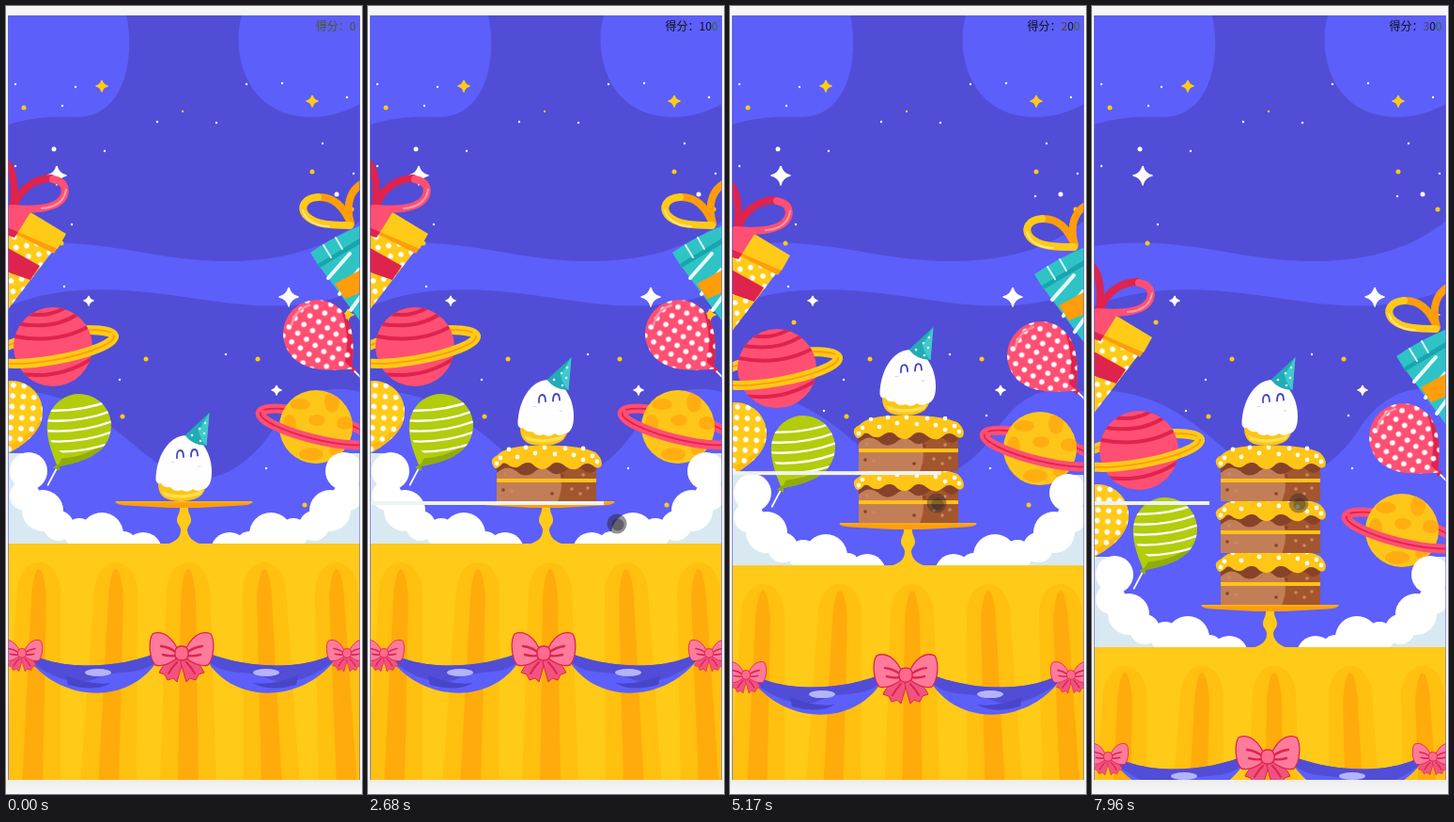
These frames come from a looping animation (379x837 px, 8 s). An HTML page:

```html
<!DOCTYPE html>
<html lang="zh">
<head>
<meta charset="utf-8">
<title>Cake stacking</title>
<style>
html, body { margin: 0; width: 100%; height: 100%; overflow: hidden; background: #f6f6f6; }
svg { display: block; width: 379px; height: 837px; }
text { font: 12px "Noto Sans CJK SC", "Noto Sans CJK", "Noto Sans", sans-serif; }
</style>
</head>
<body>
<svg id="stage" viewBox="0 0 379 837"></svg>
<script>
const DARK = '#514dd6', LIGHT = '#5c5ff9', YELLOW = '#ffca18', ORANGE = '#ff9d0a';
const PINK = '#ff4f73', RED = '#de234d', TEAL = '#2fc3c6', WHITE = '#fff', MIST = '#d9e9f1';

const path = (d, fill, extra = '') => `<path d="${d}" fill="${fill}" ${extra}/>`;
const line = (d, color, w) => path(d, 'none', `stroke="${color}" stroke-width="${w}" stroke-linecap="round"`);
const dot = (x, y, r, fill) => `<circle cx="${x}" cy="${y}" r="${r}" fill="${fill}"/>`;
const oval = (x, y, rx, ry, fill, extra = '') =>
  `<ellipse cx="${x}" cy="${y}" rx="${rx}" ry="${ry}" fill="${fill}" ${extra}/>`;
const rect = (x, y, w, h, fill) => `<rect x="${x}" y="${y}" width="${w}" height="${h}" fill="${fill}"/>`;
const group = (t, s) => `<g transform="${t}">${s}</g>`;
const clip = (id, s) => `<g clip-path="url(#${id})">${s}</g>`;
const dots = (pts, r, fill) => pts.map(([x, y]) => dot(x, y, r, fill)).join('');

function star(x, y, r, fill) {
  const k = r * 0.18;
  return path(`M${x} ${y - r}Q${x + k} ${y - k} ${x + r} ${y}Q${x + k} ${y + k} ${x} ${y + r}` +
    `Q${x - k} ${y + k} ${x - r} ${y}Q${x - k} ${y - k} ${x} ${y - r}`, fill,
    `stroke="${fill}" stroke-width="1.5" stroke-linejoin="round"`);
}

function sky() {
  return rect(2, 10, 375, 812, LIGHT) +
    path('M2 10H377V228C335 262 285 272 225 271C150 269 90 242 2 255Z', DARK) +
    path('M2 10H128C137 48 130 118 75 118C45 117 25 119 2 126Z', LIGHT) +
    path('M251 10C240 45 252 118 325 118C345 118 362 112 377 104V10Z', LIGHT) +
    path('M2 319C75 288 160 305 225 314C285 322 330 320 377 301V410C330 398 302 422 282 453C260 486 230 502 208 502C140 500 115 408 2 408Z', DARK) +
    dots([[10, 83], [74, 86], [60, 106], [105, 154], [161, 123], [224, 124], [256, 83], [294, 82],
      [363, 97], [337, 146], [370, 178], [325, 202], [10, 170], [70, 232], [62, 298], [121, 397],
      [234, 370], [277, 491], [273, 435], [100, 430]], 1.2, WHITE) +
    dots([[51, 152], [352, 200]], 2.5, WHITE) +
    dots([[19, 108], [326, 176], [368, 216], [59, 252], [68, 336], [149, 375], [268, 375],
      [124, 436], [318, 530]], 2.5, YELLOW) + dot(188, 112, 1.2, YELLOW) +
    star(102, 85, 6, YELLOW) + star(326, 101, 6, YELLOW) + star(364, 328, 6, YELLOW) +
    star(54, 180, 10, WHITE) + star(301, 309, 10, WHITE) + star(88, 313, 5, WHITE) + star(288, 408, 5, WHITE);
}

function leftGift() {
  const body = 'M0 230L53 256 0 325Z';
  return path(body, YELLOW) + path(body, 'url(#polka)') +
    path('M0 256L36 276 26 291 0 282Z', RED) +
    path('M14 236L55 257 51 263 10 242Z', ORANGE) +
    path('M0 211L26 219 13 240 0 234Z', PINK) + path('M0 234L13 240 9 246 0 243Z', RED) +
    path('M26 219L64 242 55 258 13 240Z', YELLOW) +
    line('M8 211C10 192 8 176 1 167', RED, 8) +
    line('M9 211C16 193 32 183 48 183', RED, 8) +
    line('M50 184Q66 187 62 201C56 216 30 217 6 215', PINK, 8) +
    line('M64 195C62 208 52 214 38 215', '#ff9bae', 2);
}

function rightGift() {
  return path('M334 277L378 252V336Z', TEAL) +
    [0, 1, 2].map(i => line(`M${343 + i * 12} ${289 + i * 17}L${366 + i * 10} ${263 + i * 17}`, '#e8fbfb', 4)).join('') +
    path('M350 295L378 280V304L361 311Z', ORANGE) +
    path('M324 262Q350 244 378 233V252L334 278Z', TEAL) +
    path('M332 274L378 246V252L334 278Z', '#18a5ad') +
    line('M338 254L346 267M351 246L358 258', '#d6f6f6', 2) +
    line('M367 231C361 210 367 195 380 188', ORANGE, 8) +
    line('M367 231C360 214 349 203 334 203', ORANGE, 8) +
    line('M332 203C317 204 313 214 319 222C328 233 350 233 366 233', YELLOW, 8) +
    line('M316 217C319 228 331 234 344 234', '#ffe68c', 2);
}

function ring(rx, ry, color, inner, front) {
  const d = `M${-rx} 0A${rx} ${ry} 0 0 ${front ? 0 : 1} ${rx} 0`;
  return path(d, 'none', `stroke="${color}" stroke-width="10" stroke-linecap="round"`) + line(d, inner, 1.8);
}

function planets() {
  const spot = (x, y, rx, ry) => oval(x, y, rx, ry, '#ffae12');
  const pink = group('translate(50 362) rotate(-10)', ring(66, 14, YELLOW, ORANGE, false)) +
    dot(50, 362, 42, PINK) +
    clip('pinkPlanet', line('M5 336Q50 346 78 326M5 350Q55 361 92 338M5 389Q55 400 95 372M20 326Q42 332 62 321', RED, 4)) +
    group('translate(50 362) rotate(-10)', ring(66, 14, YELLOW, ORANGE, true));
  const gold = group('translate(330 447) rotate(14)', ring(61, 13, PINK, RED, false)) +
    dot(330, 447, 39, '#ffc61a') +
    clip('goldPlanet', spot(313, 423, 11, 6) + spot(347, 421, 8, 11) + spot(331, 440, 9, 6) +
      spot(302, 444, 7, 10) + spot(361, 443, 9, 7) + spot(325, 476, 13, 7) + spot(351, 472, 7, 6)) +
    group('translate(330 447) rotate(14)', ring(61, 13, PINK, RED, true));
  return pink + gold;
}

function balloon(x, y, r, tip, turn, color, shade, deco) {
  const d = `M0 ${tip}C${-r * .35} ${tip * .8} ${-r} ${r * .65} ${-r} 0A${r} ${r} 0 0 1 ${r} 0C${r} ${r * .65} ${r * .35} ${tip * .8} 0 ${tip}Z`;
  const edge = `M0 ${tip}C${r * .35} ${tip * .8} ${r} ${r * .65} ${r} 0Q${r * .7} ${r * .7} 0 ${tip * .8}Z`;
  return group(`translate(${x} ${y}) rotate(${turn})`,
    line(`M0 ${tip}V${tip + 22}`, WHITE, 1.8) + path(d, color) + path(edge, shade) +
    path(`M-4 ${tip + 3}L0 ${tip - 4} 4 ${tip + 3}Z`, shade) + (deco || path(d, 'url(#polka)')));
}

function balloons() {
  const stripes = clip('stripes', [-20, -9, 2, 13, 24].map(y =>
    group('rotate(-33)', line(`M-36 ${y}Q0 ${y + 6} 36 ${y - 4}`, WHITE, 2.4))).join(''));
  return balloon(6, 431, 33, 50, 14, YELLOW, '#ffb90f') +
    balloon(78, 446, 34, 49, 28, '#b1cd0c', '#8fac08', stripes) +
    balloon(331, 348, 36, 53, -45, PINK, RED) +
    line('M304 339Q308 322 323 318', '#ff91a7', 2.5);
}

function clouds() {
  const puffs = [[24, 494, 20], [39, 536, 22], [20, 520, 16], [56, 552, 16], [78, 560, 16], [102, 561, 23], [146, 579, 20], [125, 572, 14]];
  const mist = path('M2 475H24L40 540 78 556 146 572H2Z', MIST);
  return mist + group('translate(384 0) scale(-1 1)', mist) + rect(375, 475, 9, 97, MIST) +
    puffs.map(([x, y, r]) => dot(x, y, r, WHITE) + dot(384 - x, y, r, WHITE)).join('');
}

function fold(xt, xb, wt, wb, top, fill) {
  return path(`M${xb - wb} 830L${xt - wt} ${top + 30}C${xt - wt + 3} ${top - 10} ${xt + wt - 3} ${top - 10} ${xt + wt} ${top + 30}L${xb + wb} 830Z`, fill);
}

function bow(x, y, s) {
  const side = path('M-2 3C-12 6 -20 12 -24 21L-18 23 -15 29 -9 27 -5 31 1 10Z', '#f0537f', `stroke="${RED}"`) +
    line('M-5 10Q-10 15 -14 22', RED, 2) +
    path('M-3 0C-8 -15 -20 -25 -31 -20C-36 -12 -34 7 -28 13C-20 15 -10 11 -3 4Z', '#ff7b9c', `stroke="${RED}" stroke-width="1.3"`) +
    line('M-5 0Q-13 -6 -22 -7M-6 3Q-13 4 -20 2', RED, 2.4);
  return group(`translate(${x} ${y}) scale(${s})`, side + group('scale(-1 1)', side) +
    `<rect x="-7" y="-7" width="14" height="15" rx="6" fill="#ff6a8e" stroke="${RED}" stroke-width="1.4"/>`);
}

function table() {
  const folds = [[35, 28], [117, 109], [194, 194], [275, 283], [352, 363]];
  const swag = path('M20 684C50 706 120 706 168 684L160 697C130 742 60 740 24 694Z', LIGHT) +
    path('M20 684C50 706 120 706 168 684L160 696C140 714 120 702 92 716C70 722 45 712 24 694Z', DARK) +
    path('M64 711Q90 722 112 719Q95 729 66 721Z', '#4845c9') +
    oval(98, 708, 14, 4, '#b4b4fb');
  return rect(2, 571, 375, 260, YELLOW) +
    folds.map(([a, b]) => fold(a, b, 23, 30, 591, '#ffc010') + fold(a, b, 8, 11, 598, '#ffab0b')).join('') +
    swag + group('translate(375 0) scale(-1 1)', swag) +
    bow(17, 687, .64) + bow(363, 687, .64) + bow(187, 687, 1);
}

function stand() {
  return path('M185 531H194C193 538 197 541 197 546C197 551 193 552 193 557C194 565 200 569 208 572H171C180 569 186 565 186 557C186 552 182 551 182 546C182 541 186 538 185 531Z', YELLOW) +
    path('M116 526.5H263Q262 530 250 530.5L205 533H174L129 530.5Q117 530 116 526.5Z', ORANGE) +
    rect(117, 526, 145, 1.5, '#ffb31a');
}

// Origin: middle of the bottom edge.
function cake() {
  const sprinkles = [[-49, -46], [-40, -55], [-31, -47], [-22, -57], [-12, -51], [-2, -57], [9, -50],
    [20, -56], [29, -49], [39, -56], [49, -48], [54, -42], [-53, -40], [39, -44]];
  return rect(-53, -46, 106, 46, '#a2562f') +
    clip('cakeBody', oval(-24, -18, 40, 42, '#c27f57') +
      path('M-53 -46H53V-34Q46 -26 38 -34Q28 -40 20 -32Q10 -25 2 -33Q-6 -38 -14 -30Q-24 -24 -32 -32Q-42 -40 -53 -30Z', '#87432a')) +
    rect(-53, -24, 106, 4, '#ffc21b') +
    dots([[-44, -29], [-37, -11], [27, -13], [36, -8], [44, -14], [39, -28]], 1.8, '#c98a68') +
    dots([[-46, -12], [6, -8], [17, -27]], 1.8, '#87432a') +
    path('M-57 -38C-61 -47 -53 -47 -50 -51C-38 -60 -14 -59 0 -59C18 -60 42 -57 52 -52C56 -49 61 -42 58 -37C53 -32 49 -41 43 -40C37 -40 35 -32 27 -34C20 -35 18 -42 10 -41C3 -40 3 -33 -5 -34C-14 -35 -13 -42 -21 -41C-28 -40 -28 -35 -35 -36C-41 -37 -42 -42 -47 -40C-51 -35 -55 -33 -57 -38Z', '#ffc517') +
    dots(sprinkles, 2.4, '#fffdf2');
}

function hero() {
  return path('M162 506C162 521 169 526 188 526C205 525 212 519 213 507Z', '#fbc51c') +
    path('M166 515Q186 524 210 514L207 519Q186 526 169 520Z', '#ffe04a') +
    path('M159.500 503C160 480 172 456 193 456C210 457 220 480 219 496C219 506 215 513 210 513Q204 517 199 513Q193 518 187 514Q180 517 175 511Q168 512 165 507Q160 508 159.500 503Z', '#fffefe') +
    line('M182 480Q181.500 472 185.500 472Q189 472 189 479M197 478.500Q197 471 200.500 471Q204 471 204 477.500', '#4442bd', 1.8) +
    line('M176 484.500h3M204 489h3', '#d5d9ee', 1.2) +
    path('M216.500 432L190.500 456Q199 467 213.500 467Z', '#22abb5') +
    path('M216.500 432L205 451Q207 461 213.500 467Z', '#40c9cc') +
    dots([[198, 456], [207, 462], [206, 449], [211, 454], [212, 443]], 1.3, '#e2fafa');
}

const defs = `<defs>
  <clipPath id="screen"><rect x="2" y="10" width="375" height="812"/></clipPath>
  <clipPath id="pinkPlanet"><circle cx="50" cy="362" r="42"/></clipPath>
  <clipPath id="goldPlanet"><circle cx="330" cy="447" r="39"/></clipPath>
  <clipPath id="stripes"><circle r="34"/></clipPath>
  <clipPath id="cakeBody"><rect x="-53" y="-46" width="106" height="46"/></clipPath>
  <pattern id="polka" width="16" height="16" patternUnits="userSpaceOnUse" patternTransform="rotate(35)">
    ${dots([[4, 4], [12, 12]], 2.8, WHITE)}</pattern>
  <linearGradient id="shade" x2="0" y2="1"><stop stop-color="#ededed"/><stop offset="1" stop-color="#f8f8f8"/></linearGradient>
</defs>`;

const JUMP = 120, HALF = 385, LAYER = 55, CENTRE = 190, LOOP = 8000;
const cakes = [
  { at: 1980, x: 94, speed: .116, peak: 1870, step: 59, base: 526, hold: 600 },
  { at: 3570, x: -15, speed: .1152, peak: 4698, step: LAYER, base: 471, hold: 150 },
  { at: 5870, x: -30, speed: .1177, peak: 6902, step: LAYER, base: 416, hold: 585 }
];
for (const c of cakes) {
  c.land = c.peak + HALF * Math.sqrt(1 - c.step / JUMP);
  c.landX = c.x + c.speed * (c.land - c.at);
}

document.getElementById('stage').innerHTML = defs + rect(0, 0, 379, 837, '#f6f6f6') +
  rect(0, 822, 379, 15, 'url(#shade)') +
  clip('screen', sky() +
    `<g id="world">${leftGift() + rightGift() + planets() + balloons() + clouds() + table() + stand()}
      ${cakes.map((c, i) => `<g id="cake${i}">${cake()}</g>`).join('')}
      ${cakes.map((c, i) => `<rect id="plate${i}" y="${c.base}" height="4" fill="#eef3f4"/>`).join('')}</g>` +
    `<g id="hero">${hero()}</g>` +
    `<g id="touch">${dot(0, 0, 10.5, 'rgba(40,35,50,.5)')}${dot(1, 1, 6.5, 'rgba(25,25,30,.4)')}</g>` +
    rect(2, 10, .7, 812, '#6a66d8') + rect(376.4, 10, .6, 812, '#6a66d8')) +
  '<text id="score" x="372.500" y="26" text-anchor="end"></text>';

const el = id => document.getElementById(id);
const unit = v => Math.min(1, Math.max(0, v));
const smooth = v => { v = unit(v); return v * v * (3 - 2 * v); };
const move = (id, x, y) => el(id).setAttribute('transform', `translate(${x.toFixed(2)} ${y.toFixed(2)})`);
let shown = -1;

function setScore(n) {
  if (n === shown) return;
  shown = n;
  const span = (s, color) => `<tspan fill="${color}">${s}</tspan>`;
  el('score').innerHTML = n
    ? span('得分：', '#11111c') + span(n, ['', '#11111c', '#59412f', '#4b4653'][n]) + span('0', '#11111c') + span('0', '#2f6b35')
    : span('得分：0', '#4b5a22');
}

function draw(t) {
  let scroll = 0, height = 0, score = 0;
  cakes.forEach((c, i) => {
    const since = t - c.land;
    const x = since < 0 ? c.x + c.speed * (t - c.at)
      : c.landX + (CENTRE - c.landX) * smooth(since / 180);
    move('cake' + i, x, c.base);
    const edge = (x + 61) * (1 - unit((since - c.hold) / 380));
    el('plate' + i).setAttribute('width', Math.max(0, edge));
    if (since >= 0) {
      height += c.step;
      score = i + 1;
      if (i) scroll += LAYER * smooth((since - 20) / 380);
    } else if (t > c.peak - HALF) {
      height += JUMP * (1 - ((t - c.peak) / HALF) ** 2);
    }
  });
  move('world', 0, scroll);
  move('hero', 0, scroll - height);
  const slide = smooth((t - 2900) / 450);
  move('touch', 265 - 45 * slide, 550 - 22 * slide);
  el('touch').setAttribute('opacity', t < 1470 ? 0 : t < 5000 ? 1 : .8);
  setScore(score);
}

const start = performance.now();
function tick() {
  draw((performance.now() - start) % LOOP);
  requestAnimationFrame(tick);
}
tick();
</script>
</body>
</html>
```
